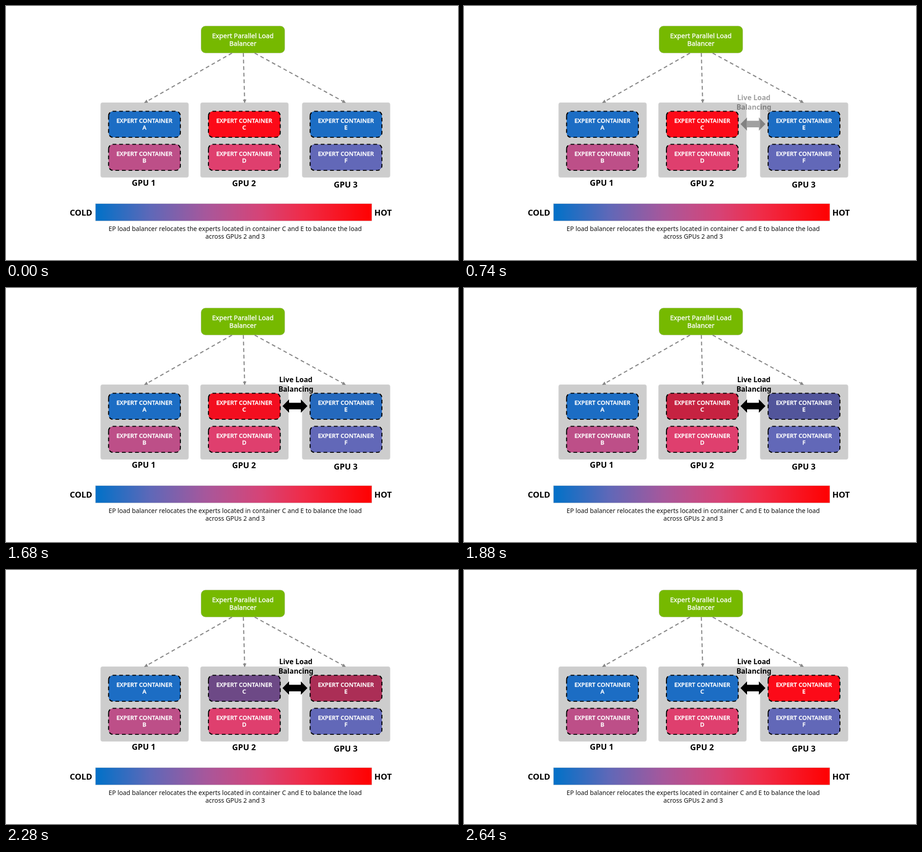
An HTML page that plays this animation: 998 by 561 pixels, repeating every 5030 ms.

```html
<!DOCTYPE html>
<html lang="en">
<head>
<meta charset="utf-8">
<title>Expert parallel load balancing</title>
<style>
  html, body { margin: 0; width: 100%; height: 100%; overflow: hidden; background: #fff; }
  svg { display: block; width: 998px; height: 561px; font-family: "Noto Sans", "Open Sans", sans-serif; text-anchor: middle; }
  .panel { fill: #cdcdcd; stroke: #d8d8d8; }
  .edge { stroke: #d0d0d0; stroke-width: .7; }
  .box { stroke: #000; stroke-width: 2.2; stroke-dasharray: 8.3 6.2; }
  .label { font: 600 13.1px "Open Sans", "Noto Sans", sans-serif; fill: #fff; stroke: #fff; stroke-width: .35; }
  .title { font-size: 14.6px; font-weight: 500; fill: #fff; stroke: #fff; stroke-width: .4; }
  .gpu { font-size: 17.9px; font-weight: 700; }
  .scale { font-size: 18.3px; font-weight: 700; }
  .caption { font-size: 13.82px; fill: #111; }
  .live { font-size: 15.6px; font-weight: 700; }
  .link { stroke: #898989; stroke-width: 2.4; stroke-dasharray: 8.3 6.2; marker-end: url(#tip); }
</style>
</head>
<body>
<svg id="stage" viewBox="0 0 998 561">
  <defs>
    <linearGradient id="heat">
      <stop offset="0" stop-color="#0071c8"/>
      <stop offset=".2" stop-color="#5f68b8"/>
      <stop offset=".4" stop-color="#a7579b"/>
      <stop offset=".5" stop-color="#c04e89"/>
      <stop offset=".6" stop-color="#d64376"/>
      <stop offset=".75" stop-color="#ef2c49"/>
      <stop offset="1" stop-color="#f00"/>
    </linearGradient>
    <marker id="tip" markerUnits="userSpaceOnUse" markerWidth="8" markerHeight="8" refX="7" refY="4" orient="auto">
      <path d="M0 0L8 4L0 8z" fill="#898989"/>
    </marker>
  </defs>
  <rect class="edge" x="430.5" y="44" width="185.2" height="60" rx="10" fill="#76b900"/>
  <rect class="edge" x="197.5" y="436.4" width="610.3" height="38.4" fill="url(#heat)"/>
</svg>
<script>
const LOOP = 5030, STEP = 40;
const COLD = [28, 109, 196], HOT = [252, 10, 24];
const stage = document.getElementById("stage");

function add(tag, attrs, parent = stage) {
  const el = document.createElementNS("http://www.w3.org/2000/svg", tag);
  for (const key in attrs) el.setAttribute(key, attrs[key]);
  return parent.appendChild(el);
}

function text(cls, x, y, str, parent) {
  add("text", { class: cls, x, y }, parent).textContent = str;
}

function mix(a, b, p) {
  return `rgb(${a.map((v, i) => Math.round(v + (b[i] - v) * p))})`;
}

// The outline starts on the left side, below the top corner, so its dashes do too
function container(x, y, name, fill) {
  const d = `M${x} ${y + 10}a10 10 0 0 1 10-10h138.5a10 10 0 0 1 10 10v37.5a10 10 0 0 1-10 10h-138.5a10 10 0 0 1-10-10z`;
  const box = add("path", { class: "box", d, fill });
  text("label", x + 79, y + 25.5, "EXPERT CONTAINER");
  text("label", x + 79, y + 40.3, name);
  return box;
}

function gpu(x, name, labelX, labelY, top, topFill, bottom, bottomFill) {
  add("rect", { class: "panel", x: x + .5, y: 213.5, width: 194, height: 165, rx: 4 });
  const box = container(x + 18, 232.5, top, topFill);
  container(x + 18, 305.5, bottom, bottomFill);
  text("gpu", labelX, labelY, name);
  return box;
}

text("title", 523, 71, "Expert Parallel Load");
text("title", 523, 87.5, "Balancer");

gpu(208.5, "GPU 1", 304, 397, "A", mix(COLD, HOT, 0), "B", "#bd4f88");
const boxC = gpu(429, "GPU 2", 525.5, 398, "C", mix(HOT, COLD, 0), "D", "#df3f6e");
const boxE = gpu(653.5, "GPU 3", 750, 400.5, "E", mix(COLD, HOT, 0), "F", "#6268b8");

for (const [x1, x2] of [[499, 306], [524, 527], [549, 749.5]])
  add("line", { class: "link", x1, y1: 104, x2, y2: 213.5 });

text("scale", 165.5, 462.8, "COLD");
text("scale", 832.5, 462.8, "HOT");
text("caption", 506, 497, "EP load balancer relocates the experts located in container C and E to balance the load");
text("caption", 506, 513.5, "across GPUs 2 and 3");

const live = add("g", { opacity: 0 });
text("live", 640, 208, "Live Load", live);
text("live", 640, 228.5, "Balancing", live);
add("path", { d: "M610.5 260.8L625 246V253.4H651V246L665.5 260.8L651 275.5V268.1H625V275.5z" }, live);

// Stepped linear progress, clamped to 0..1
function progress(t, start, length) {
  const passed = Math.floor((t - start) / STEP) * STEP;
  return Math.min(1, Math.max(0, passed / length));
}

function draw(now) {
  const t = now % LOOP;
  const swap = progress(t, 1640, 1000);
  live.setAttribute("opacity", progress(t, 460, 760));
  boxC.setAttribute("fill", mix(HOT, COLD, swap));
  boxE.setAttribute("fill", mix(COLD, HOT, swap));
}

let start;
function tick(now) {
  start ??= now;
  draw(now - start);
  requestAnimationFrame(tick);
}
requestAnimationFrame(tick);
</script>
</body>
</html>
```
